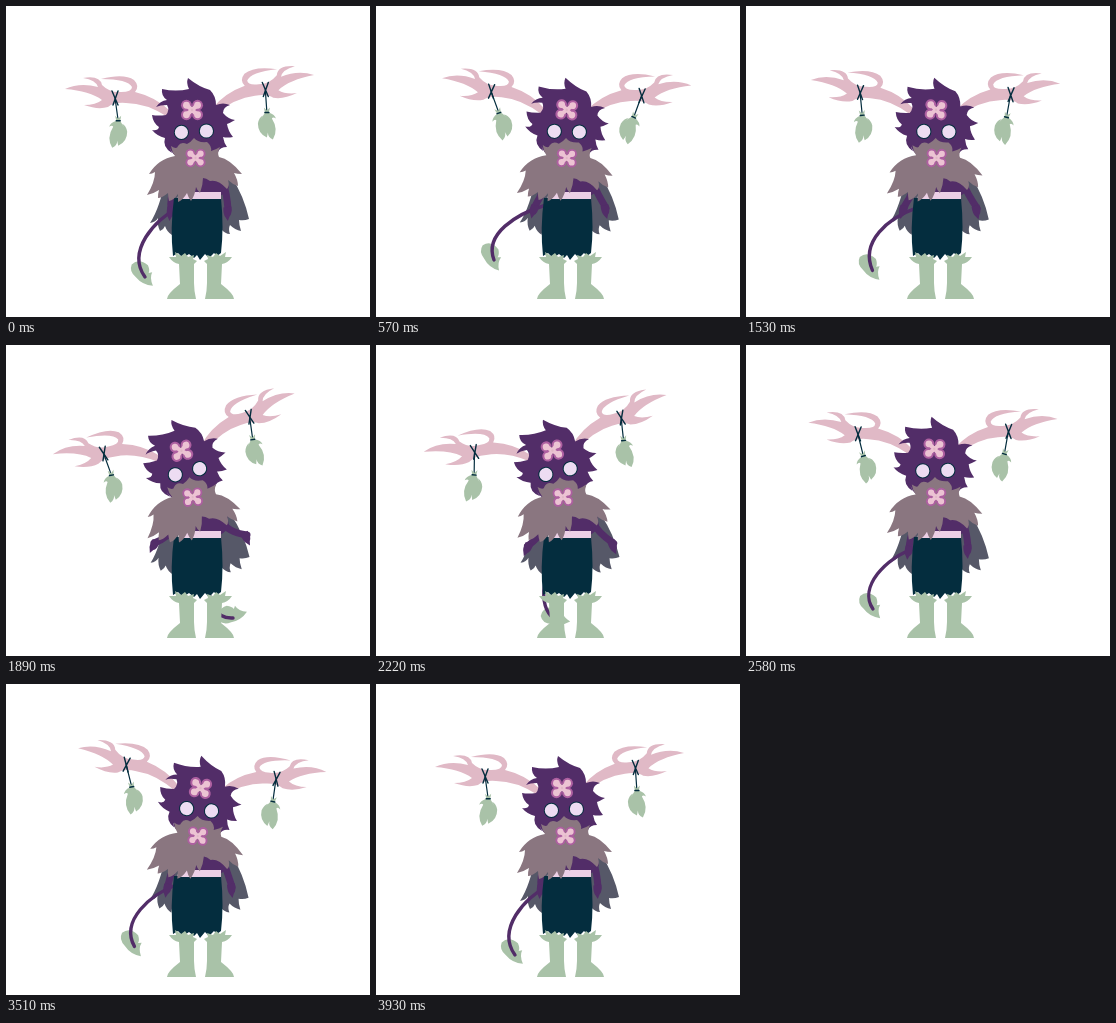
Animation of 364x311 px, one loop 3960 ms. Source, as an HTML page with a canvas:

```html
<!DOCTYPE html>
<html lang="en">
<head>
<meta charset="utf-8">
<title>Forest creature</title>
<style>
  html, body { margin: 0; width: 100%; height: 100%; overflow: hidden; background: #fff; }
  canvas { display: block; }
</style>
</head>
<body>
<canvas id="stage" width="364" height="311"></canvas>
<script>
const ctx = document.getElementById('stage').getContext('2d');
const LOOP = 3960, RAD = Math.PI / 180;
const C = {
  purple: '#522d68', pink: '#e0b9c6', mauve: '#8a7680', slate: '#565868', green: '#a9c2a8',
  navy: '#042d3e', belt: '#ecd0e6', magenta: '#ad5fa0', petal: '#ecc3d3', eye: '#eddcf2'
};

const shape = {
  antler: 'M162,111 Q140,97 120,97 Q108,96 102,101 Q92,104 78,99 Q90,99 96,94 Q84,85 59,83 Q74,76 92,81 Q90,74 77,72 Q94,69 96,79 Q104,87 115,86 Q126,86 126,81 Q122,73 95,73 Q118,67 128,74 Q134,80 129,86 Q150,91 164,105Z',
  hair: 'M182,72 Q193,81 204,84 Q210,90 210,99 Q217,96 224,99 Q217,101 217,107 Q222,113 229,114 Q224,117 221,118 Q222,125 227,131 Q221,132 217,131 Q218,137 221,141 Q214,141 212,146 L170,150 Q164,146 163,138 Q164,144 166,147 Q156,141 159,132 Q151,130 146,124 Q152,125 153,121 Q147,117 146,109 Q152,110 160,109 Q164,104 161,99 Q154,99 150,101 Q154,95 161,94 Q155,90 156,83 Q170,86 183,83 Q180,77 182,72Z',
  cape: 'M188,132 Q192,137 201,136 Q206,140 205,145 Q211,143 214,141 Q211,147 213,151 Q224,153 236,168 Q231,168 228,167 Q232,174 232,180 Q226,178 222,174 Q224,180 221,183 Q212,173 204,175 Q200,172 197,172 Q197,179 194,187 Q191,184 190,181 Q189,189 185,195 Q182,191 181,187 Q177,194 172,196 Q172,191 172,188 Q168,194 163,195 Q162,190 162,187 Q156,192 152,192 Q152,187 153,184 Q147,188 141,189 Q149,176 149,166 Q146,168 143,168 Q152,153 169,150 Q166,146 165,140 Q171,144 172,140 Q175,135 181,138 Q185,136 188,132Z',
  back: 'M160,170 Q154,202 144,217 Q150,216 152,212 Q151,219 154,225 Q158,223 159,220 Q161,226 166,229 L172,190 212,185 214,222 Q219,228 224,228 Q222,223 224,219 Q229,224 235,225 Q233,219 233,214 Q238,215 243,213 Q238,190 225,170Z',
  torso: 'M176,165H220L223,181 Q220,187 214,190H178Z',
  shorts: 'M168,192H215 Q218,222 215,247 L211,250 208,247 203,252 199,248 194,254 191,249 188,252 183,248 177,252 172,247 167,250 Q164,222 168,192Z',
  boot: 'M163,251 L170,251 169,246 175,250 179,247 182,251 188,249 187,253 191,255 188,258 188,277 Q188,284 190,293 L161,293 Q161,288 174,278 L173,258 Q167,257 163,251Z',
  leaf: 'M-2,0 Q-8,2 -9,6 Q-6,4 -5,6 Q-12,17 -6,27 Q-1,25 -1,20 L0,25 Q9,21 9,11 Q8,5 4,3 L6,7 2,0 3,-5 0,-2 -3,-5Z',
  tuft: 'M-14,2 Q-14,-8 -2,-9 Q3,-7 4,-4 L6,-7 Q8,-1 16,2 Q8,9 -2,8 Q-11,9 -14,2Z',
  hand: 'M-4,-6 Q-5,1 -3,4 L-1,8 1,4 Q4,2 4,-6Z'
};
for (const k in shape) shape[k] = new Path2D(shape[k]);

// charms: left swing, left leaf, right swing, right leaf; hands: left, right;
// tail: base, two controls, tip, tuft angle
const pose = (charms, hands, tail) => [...charms, ...hands, ...tail];
const rest = pose([8, 0, 4, 0], [165, 207, 222, 207], [170, 203, 150, 213, 120, 245, 139, 271, 45]);
const out = pose([20, -20, -20, 25], [158, 205, 230, 205], [170, 199, 140, 208, 108, 228, 118, 254, 57]);
const dip = pose([-12, 12, 4, 0], [155, 206, 234, 206], [170, 206, 150, 220, 130, 252, 149, 277, 30]);
const fling = pose([20, -10, 8, -8], [148, 201, 241, 193], [190, 205, 206, 230, 197, 275, 227, 273, -15]);
const rise = pose([14, -18, -10, 17], [163, 207, 222, 206], [168, 204, 140, 212, 112, 243, 127, 264, 48]);
const fall = pose([17, -22, -15, 22], [157, 205, 230, 206], [170, 201, 144, 209, 109, 235, 121, 259, 53]);

const limbs = [[0, rest], [200, rise], [570, out], [840, rest], [1110, dip], [1400, out],
  [1680, dip], [1890, fling], [2070, fling], [2320, dip], [2580, rise], [2850, out],
  [3090, fall], [3330, rest], [3690, out], [3930, rest], [LOOP, rest]];
const tilt = [[0, 0], [380, 8.3], [570, 4.9], [760, 0], [1110, 8.5], [1450, 0], [1700, 16.5],
  [1890, -10.8], [2010, -21], [2160, -12.5], [2580, 2.3], [2835, 8], [3090, 2.5],
  [3210, 0.3], [3580, 9.5], [3810, 3.5], [3930, 0], [LOOP, 0]]
  .map(([t, v]) => [t, [v]]);

// Cubic interpolation that flattens at turning points
function sample(track, t) {
  let i = 0;
  while (i < track.length - 2 && track[i + 1][0] <= t) i++;
  const [t0, a] = track[i], [t1, b] = track[i + 1], d = t1 - t0, u = (t - t0) / d;
  return a.map((p, k) => {
    const slope = j => {
      if (j < 1 || j > track.length - 2) return 0;
      const [A, B, D] = [track[j - 1], track[j], track[j + 1]];
      const s = (B[1][k] - A[1][k]) / (B[0] - A[0]), e = (D[1][k] - B[1][k]) / (D[0] - B[0]);
      return s * e > 0 ? 2 * s * e / (s + e) : 0;
    };
    const q = b[k], v = u * u * (3 - 2 * u);
    return p + (q - p) * v + d * u * (1 - u) * (slope(i) * (1 - u) - slope(i + 1) * u);
  });
}

function fill(path, color) {
  ctx.fillStyle = color;
  ctx.fill(path);
}

function at(x, y, angle, draw, flip = 1) {
  ctx.save();
  ctx.translate(x, y);
  ctx.rotate(angle * RAD);
  ctx.scale(flip, 1);
  draw();
  ctx.restore();
}

const around = (x, y, angle, draw) => at(x, y, angle, () => {
  ctx.translate(-x, -y);
  draw();
});

function mirrored(axis, draw) {
  draw();
  at(axis * 2, 0, 0, draw, -1);
}

function line(color, width, ...segments) {
  ctx.strokeStyle = color;
  ctx.lineWidth = width;
  ctx.stroke(new Path2D(segments.join(' ')));
}

function disc(x, y, r, color) {
  ctx.beginPath();
  ctx.arc(x, y, r, 0, 7);
  ctx.fillStyle = color;
  ctx.fill();
}

function flower(x, y, size) {
  at(x, y, 0, () => {
    ctx.scale(size, size);
    for (const [r, c] of [[5.3, C.magenta], [3.3, C.petal]])
      for (const sx of [-1, 1]) for (const sy of [-1, 1]) disc(sx * 5.4, sy * 4.6, r, c);
    line(C.petal, 4, 'M-5,-4.5 L5,4.5 M5,-4.5 L-5,4.5');
    disc(0, 0, 1.2, C.pink);
  });
}

function arm(x, y, hx, hy, side) {
  line(C.purple, 7, 'M', x, y, 'Q', x + side * 4, y + 10, hx, hy - 3);
  at(hx, hy, (x - hx) * 1.2, () => fill(shape.hand, C.purple));
}

function charm(x, y, tilt, swing, leaf, side) {
  const a = tilt * RAD, dx = x - 190, dy = y - 160;
  const hx = 190 + dx * Math.cos(a) - dy * Math.sin(a);
  const hy = 160 + dx * Math.sin(a) + dy * Math.cos(a);
  const kx = hx + 23 * Math.sin(swing * RAD), ky = hy + 23 * Math.cos(swing * RAD);
  at(hx, hy, tilt, () => line(C.navy, 1.4, 'M-3,-7 L3,7 M3,-7 L-2,7'));
  line(C.navy, 1.2, 'M', hx, hy, 'L', kx, ky);
  at(kx, ky, leaf, () => {
    fill(shape.leaf, C.green);
    line(C.navy, 1.4, 'M-2,0 H2');
  }, side);
}

function head() {
  around(190, 160, -3.2, () => mirrored(188.2, () =>
    around(190, 160, 3.2, () => fill(shape.antler, C.pink))));
  fill(shape.hair, C.purple);
  for (const [x, y] of [[175.4, 126.4], [200.4, 125]]) {
    disc(x, y, 7.6, C.navy);
    disc(x, y, 6.6, C.eye);
  }
  flower(186, 104, 1.03);
}

function draw(t) {
  const [a] = sample(tilt, t);
  const [ls, ll, rs, rl, lx, ly, rx, ry, bx, by, cx, cy, dx, dy, ex, ey, tuft] = sample(limbs, t);
  ctx.fillStyle = '#fff';
  ctx.fillRect(0, 0, 364, 311);
  ctx.lineCap = 'round';

  around(190, 185, a * 0.1, () => fill(shape.back, C.slate));
  at(ex - 2, ey - 4, tuft, () => fill(shape.tuft, C.green));
  line(C.purple, 3.4, 'M', bx, by, 'C', cx, cy, dx, dy, ex, ey);
  fill(shape.torso, C.purple);
  arm(168, 182, lx, ly, -1);
  arm(217, 177, rx, ry, 1);
  fill(shape.shorts, C.navy);
  ctx.fillStyle = C.belt;
  ctx.fillRect(174, 186, 41, 7);
  mirrored(194.5, () => fill(shape.boot, C.green));

  around(190, 160, a, head);
  charm(109, 92, a, ls, ll, 1);
  charm(259.3, 83.5, a, rs, rl, -1);
  around(190, 185, a * 0.45, () => {
    fill(shape.cape, C.mauve);
    flower(189.5, 152, 0.94);
  });
}

const start = performance.now();
function frame() {
  draw((performance.now() - start) % LOOP);
  requestAnimationFrame(frame);
}
frame();
</script>
</body>
</html>
```
